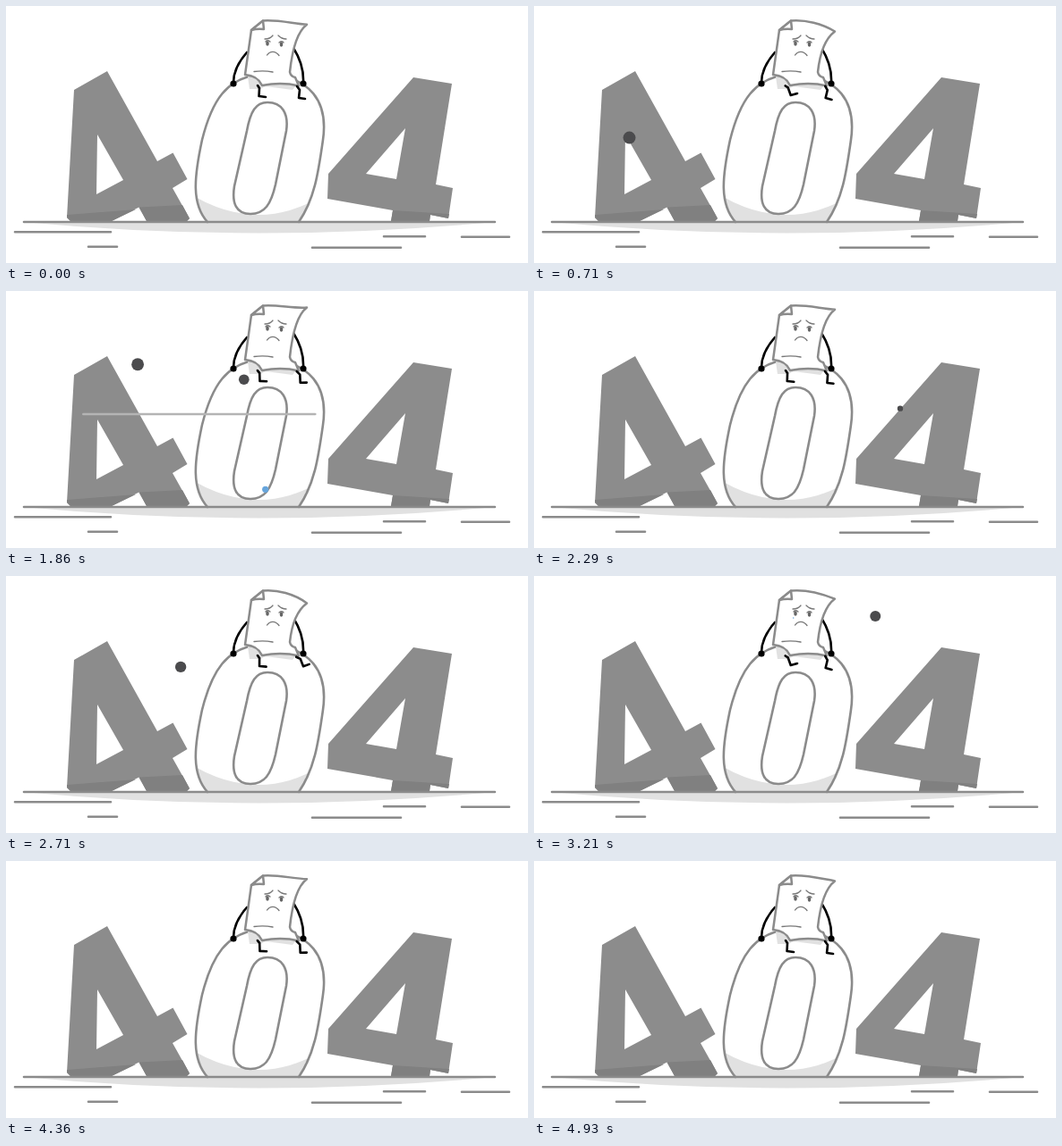
An HTML page that plays this animation: 583 by 288 pixels, repeating every 5 s.

```html
<!DOCTYPE html>
<html lang="en">
<head>
<meta charset="utf-8">
<title>404</title>
<style>
html, body { margin: 0; width: 100%; height: 100%; overflow: hidden; background: #fff; }
svg { display: block; width: 100%; height: 100%; }
.line { fill: none; stroke: #8b8b8b; stroke-width: 2.6; stroke-linecap: round; stroke-linejoin: round; }
.paper { fill: #fff; stroke: #8b8b8b; stroke-width: 2.5; stroke-linejoin: round; }
.limb { fill: none; stroke: #000; stroke-width: 2.6; stroke-linecap: round; stroke-linejoin: round; }
.face { fill: none; stroke: #777; stroke-width: 1.3; stroke-linecap: round; }
.eye { fill: #666; }
.gust { stroke: #b4b4b4; stroke-width: 2.6; stroke-linecap: round; }
.digit { fill: #8c8c8c; fill-rule: evenodd; }
.shade { fill: #e1e1e1; }
.dark { fill: #808080; }
.dust { fill: #4b4b4d; }
.tear { fill: #66a5dc; }
</style>
</head>
<body>
<svg viewBox="0 0 583 288">
  <defs>
    <path id="zero" d="M225 242C207 222 210 192 219 150C229 110 245 77 289 77C341 78 360 108 354 150C349 185 345 216 327 242"/>
    <clipPath id="inZero"><use href="#zero"/></clipPath>
  </defs>

  <path class="shade" d="M19 242Q283 267 546 242Z"/>

  <path class="digit" d="M76 94L113 73L169 174L186.5 164.5L202.5 194L186 204L205 238L202 241H157L148.5 225.5L118 241H72L68 237ZM102 144L131 195L101 211Z"/>
  <path class="dark" d="M68 234L145 228L118 241H72L68 237ZM148.5 225.5L197 223L205 238L202 241H157Z"/>
  <path class="digit" d="M455 80L498 87L480 200L499 204L494 238L474 234L473 241H430L432 229L359 216L360 188ZM446 137L436 194L402 188Z"/>
  <path class="dark" d="M392 222L432 229L495 233L494 238L474 234L473 241H430L432 229Z"/>

  <use href="#zero" fill="#fff"/>
  <path class="shade" clip-path="url(#inZero)" d="M208 212Q283 256 354 212V242H208Z"/>
  <use href="#zero" class="line"/>
  <path class="line" style="fill:#fff" d="M292 108C308 108 316 120 313 140L301 200C296 222 289 233 273 233C257 233 252 221 255 202L269 140C273 118 279 108 292 108Z"/>

  <path class="line" d="M20 242H546M10 253.2H117M92 269.7H124M422 258.2H468M509 258.7H562M342 270.7H441"/>

  <path class="shade" d="M270 79L272 93H284L290 90L320 94L325 88Z"/>
  <path class="limb" d="M269 52Q254 69 254 86M321 47Q333 66 332 86"/>
  <circle cx="254" cy="87" r="3.6"/>
  <circle cx="332" cy="87" r="3.6"/>
  <path id="sheet" class="paper"/>
  <path class="paper" d="M274 27L287 16.5L288 26Q281 25 274 27Z"/>
  <path class="face" d="M277 73.5Q288 72 298 74"/>
  <path class="face" d="M289 37Q295 37 298 33M304 33Q308 37 313 37M291.5 55C295 50 301 50 305 55.5M290 40Q292 37.5 295 40M305 41Q308 38.5 310 41"/>
  <ellipse class="eye" cx="292" cy="42" rx="1.8" ry="2.8"/>
  <ellipse class="eye" cx="307.5" cy="43" rx="1.8" ry="2.8"/>
  <g class="limb">
    <path id="legL" d="M281 89L283 92L282.5 101L290 102"/>
    <path id="legR" d="M325 90L328 94L327 103L334 104"/>
  </g>

  <g id="air"></g>
</svg>
<script>
const LOOP = 5000, FLUTTER = 1920, SWING = 2500, GUST = 800;
const $ = id => document.getElementById(id);
const clamp = v => Math.min(1, Math.max(0, v));
const smooth = v => (v = clamp(v), v * v * (3 - 2 * v));
const easeOut = v => 1 - (1 - v) ** 2;

function add(tag, cls) {
  const el = document.createElementNS('http://www.w3.org/2000/svg', tag);
  el.setAttribute('class', cls);
  return $('air').appendChild(el);
}

function set(el, attrs) {
  for (const k in attrs) el.setAttribute(k, attrs[k]);
}

function bezier(a, b, c, d, u) {
  const v = 1 - u;
  return v * v * v * a + 3 * v * v * u * b + 3 * v * u * u * c + u * u * u * d;
}

// Eases between [phase, angle] poses.
function pose(keys, u) {
  const i = keys.findIndex(k => k[0] > u);
  const [a, from] = keys[i - 1], [b, to] = keys[i];
  return from + (to - from) * smooth((u - a) / (b - a));
}

const leftLeg = [[0, 0], [.52, -40], [.75, -5], [1, 0]];
const rightLeg = [[0, 0], [.08, -28], [.28, 7], [.52, 22], [.74, -9], [1, 0]];

const dust = [
  { start: 430, end: 1140, size: 7, x: [32, 70, 180, 290], y: [190, 180, 100, -12] },
  { start: 1210, end: 2640, size: 6, x: [82, 202, 354, 538], y: [63, 84, 117, 163] },
  { start: 1660, end: 2290, size: 7, x: [95, 143, 211, 300], y: [88, 95, 61, -12] },
  { start: 2400, end: 3830, size: 7, x: [126, 186, 490, 587], y: [112, 135, -60, 98] }
];
const gusts = [
  { start: 810, x: 209, w: 300, y: 0 },
  { start: 1550, x: 44, w: 481, y: 138 },
  { start: 3260, x: 44, w: 481, y: 138 }
];
const tears = [{ fall: 1464 }, { fall: 3705 }];

for (const d of dust) d.el = add('circle', 'dust');
for (const g of gusts) g.el = add('line', 'gust');
for (const d of tears) d.el = add('circle', 'tear');

function drawBody(t) {
  const a = 2 * Math.PI * t / FLUTTER;
  const y = 23.7 - 3 * Math.cos(a) + 4.2 * Math.sin(3 * a);
  set($('sheet'), {
    d: `M274 27L287 16.5C303 15 322 20 336 ${y}` +
       `C324 ${y + 9} 319 55 317 74Q318 79 323 80L327 89.5` +
       'Q308 85 286 89Q281 78 267 77Z'
  });
  const u = t % SWING / SWING;
  set($('legL'), { transform: `rotate(${pose(leftLeg, u)} 282 90)` });
  set($('legR'), { transform: `rotate(${pose(rightLeg, u)} 326 92)` });
}

function drawDust({ start, end, size, x, y, el }, t) {
  const u = clamp((t - start) / (end - start));
  set(el, {
    cx: bezier(...x, u), cy: bezier(...y, u),
    r: Math.max(0, size * Math.sin(Math.PI * u ** .7))
  });
}

// The head runs ahead and the tail catches up.
function drawGust({ start, x, w, y, el }, t) {
  const u = clamp((t - start) / GUST);
  set(el, {
    x1: x + w * smooth((u - .29) / .54), x2: x + w * easeOut(u), y1: y, y2: y,
    visibility: u > 0 && u < .83 ? 'visible' : 'hidden'
  });
}

// A tear swells at the eye, then falls freely.
function drawTear({ fall, el }, t) {
  const u = t - fall, drop = Math.max(u, 0);
  const y = 47 + 2 * clamp(1 + u / 500) + .0011 * drop * drop;
  const r = 3.6 * clamp((u + 650) / 730);
  set(el, { cx: 289.7, cy: y, r: y > 225 ? 0 : r });
}

function draw(t) {
  drawBody(t);
  for (const d of dust) drawDust(d, t);
  for (const g of gusts) drawGust(g, t);
  for (const d of tears) drawTear(d, t);
}

const begin = performance.now();
function tick() {
  draw((performance.now() - begin) % LOOP);
  requestAnimationFrame(tick);
}
tick();
</script>
</body>
</html>
```
